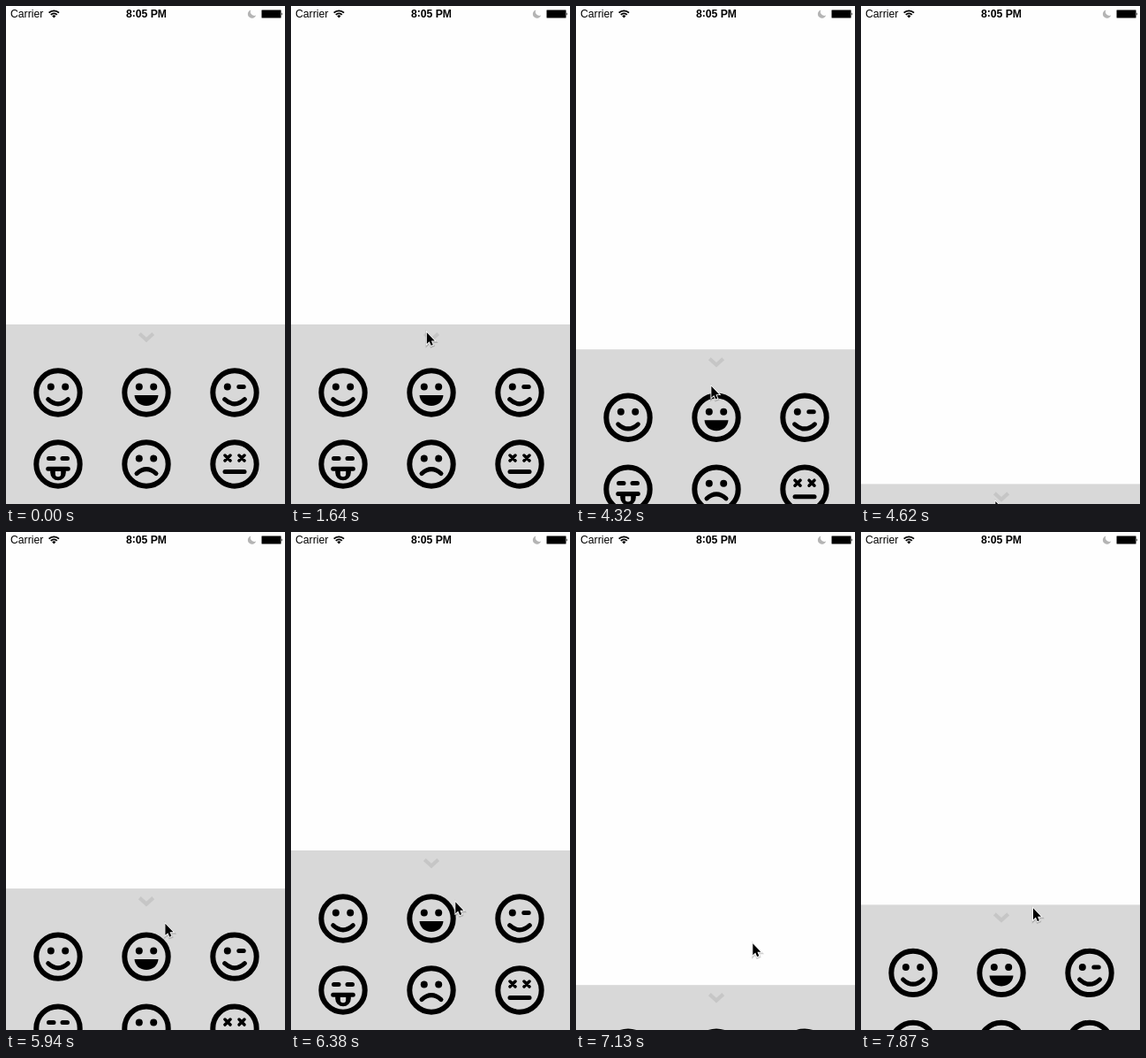
An HTML page that plays this animation: 316x563 px, repeating every 8000 ms.

```html
<!DOCTYPE html>
<html lang="en">
<head>
<meta charset="utf-8">
<title>Sliding emoji panel</title>
<style>
  html, body { margin: 0; width: 100%; height: 100%; overflow: hidden; background: #fefefe; }
  svg { display: block; width: 316px; height: 563px; }
  text { font: 12.2px "Liberation Sans", Arial, sans-serif; }
  .time { font-weight: bold; text-anchor: middle; }
  .line { fill: none; stroke: #000; stroke-width: 5; stroke-linecap: round; }
</style>
</head>
<body>
<svg viewBox="0 0 316 563">
  <defs>
    <circle id="ring" r="24.7" fill="none" stroke="#000" stroke-width="6"/>
    <circle id="eye" r="4"/>
    <g id="eyes"><use href="#eye" x="-8.2" y="-6.5"/><use href="#eye" x="8.2" y="-6.5"/></g>
    <path id="smile" class="line" d="M-11.3 7.6Q0 18 11.3 7.6"/>
    <path id="cross" class="line" style="stroke-width:3.5" d="M-3-3L3 3M3-3L-3 3"/>
    <path id="arrow" d="M0 0V13L2.9 10.3L4.8 14.8L7 13.9L5.1 9.4H9Z"/>
  </defs>

  <text x="5" y="13.3">Carrier</text>
  <path d="M48.6 7.6A8.3 8.3 0 0 1 60 7.6M50.8 9.9A5.1 5.1 0 0 1 57.8 9.9"
    fill="none" stroke="#000" stroke-width="1.9"/>
  <path d="M52.2 11.3A3 3 0 0 1 56.4 11.3L54.3 13.5Z"/>
  <text class="time" x="159" y="13.3">8<tspan dy="-1">:</tspan><tspan dy="1">05 PM</tspan></text>
  <path fill="#b4b4b4" d="M277.3 4.4A4.8 4.8 0 1 0 283.2 10.6A4.6 4.6 0 0 1 277.3 4.4Z"/>
  <rect x="289.5" y="4.5" width="22" height="9" rx="1" stroke="#808080"/>
  <path d="M312.2 7.3Q313.8 9 312.2 10.7Z"/>

  <g id="panel">
    <rect width="316" height="210" fill="#d8d8d8"/>
    <path d="M151.3 10.5L159 17.5L166.7 10.5" fill="none" stroke="#c6c6c6" stroke-width="4.2"/>
    <g transform="translate(59 77)">
      <use href="#ring"/><use href="#eyes"/><use href="#smile"/>
    </g>
    <g transform="translate(159 77)">
      <use href="#ring"/><use href="#eyes"/>
      <path d="M-13.5 3H13.5C13 10 7.5 15 0 15S-13 10-13.5 3Z"/>
    </g>
    <g transform="translate(259 77)">
      <use href="#ring"/><use href="#eye" x="-8.2" y="-6.5"/><use href="#smile"/>
      <path class="line" d="M4.8-6.5H10.2"/>
    </g>
    <g transform="translate(59 158)">
      <use href="#ring"/>
      <path class="line" d="M-10.5-6.6H-5M5-6.6H10.5M-11.3 5.2H11.3"/>
      <path d="M-8.8 5V9.5A8.8 8.8 0 0 0 8.8 9.5V5Z"/>
      <path fill="#d8d8d8" d="M-3.2 8H3.2V11A3.2 3.2 0 0 1-3.2 11Z"/>
    </g>
    <g transform="translate(159 158)">
      <use href="#ring"/><use href="#eyes"/>
      <path class="line" d="M-11 10.6Q0 .8 11 10.6"/>
    </g>
    <g transform="translate(259 158)">
      <use href="#ring"/><use href="#cross" x="-8" y="-7"/><use href="#cross" x="8" y="-7"/>
      <path class="line" d="M-11 8.6H11"/>
    </g>
  </g>

  <g id="cursor">
    <use href="#arrow" x=".3" y="1" fill="none" stroke="#000" stroke-opacity=".18" stroke-width="3"/>
    <use href="#arrow" stroke="#fff" stroke-width="1.8" paint-order="stroke"/>
  </g>
</svg>
<script>
  const LOOP = 8000, TICK = 145;
  const OPEN = 360, TRAVEL = 180.4;
  const gestureStarts = [450, 900, 4040, 5210, 6380, 7430];
  const panel = document.getElementById('panel');
  const cursor = document.getElementById('cursor');

  // The picture advances in ticks, counted afresh from each gesture.
  function tickTime(t) {
    const start = gestureStarts.filter(s => s <= t).pop() || 0;
    return start + Math.floor((t - start) / TICK) * TICK;
  }

  function draw(now) {
    const t = tickTime(now % LOOP);
    const linear = (start, length) => Math.min(1, Math.max(0, (t - start) / length));
    const smooth = (start, length) => {
      const u = linear(start, length);
      return u * u * (3 - 2 * u);
    };

    const close = smooth(4040, 580) + smooth(6380, 967);
    const reopen = smooth(5130, 1180) + smooth(7395, 773);
    const top = OPEN + TRAVEL * (close - reopen);

    // Pointer: enter, approach the chevron, then pull down and lift up twice.
    const enter = linear(450, 145), approach = smooth(740, 885);
    const pull = linear(3982, 638), lift = smooth(5130, 1095);
    const flick = smooth(6380, 725), flickBack = smooth(7395, 470);
    const x = 278.3 - 31 * enter - 93.5 * approach - 1.5 * pull + 34 * lift + 14 * flick - 5.3 * flickBack;
    const y = 328.5 - 22.5 * enter + 63 * approach + 191 * pull - 141.7 * lift + 47 * flick - 40 * flickBack;

    panel.setAttribute('transform', `translate(0 ${top})`);
    cursor.setAttribute('transform', `translate(${x} ${y})`);
    cursor.setAttribute('visibility', t < gestureStarts[0] ? 'hidden' : 'visible');
    requestAnimationFrame(() => draw(performance.now()));
  }
  draw(0);
</script>
</body>
</html>
```
